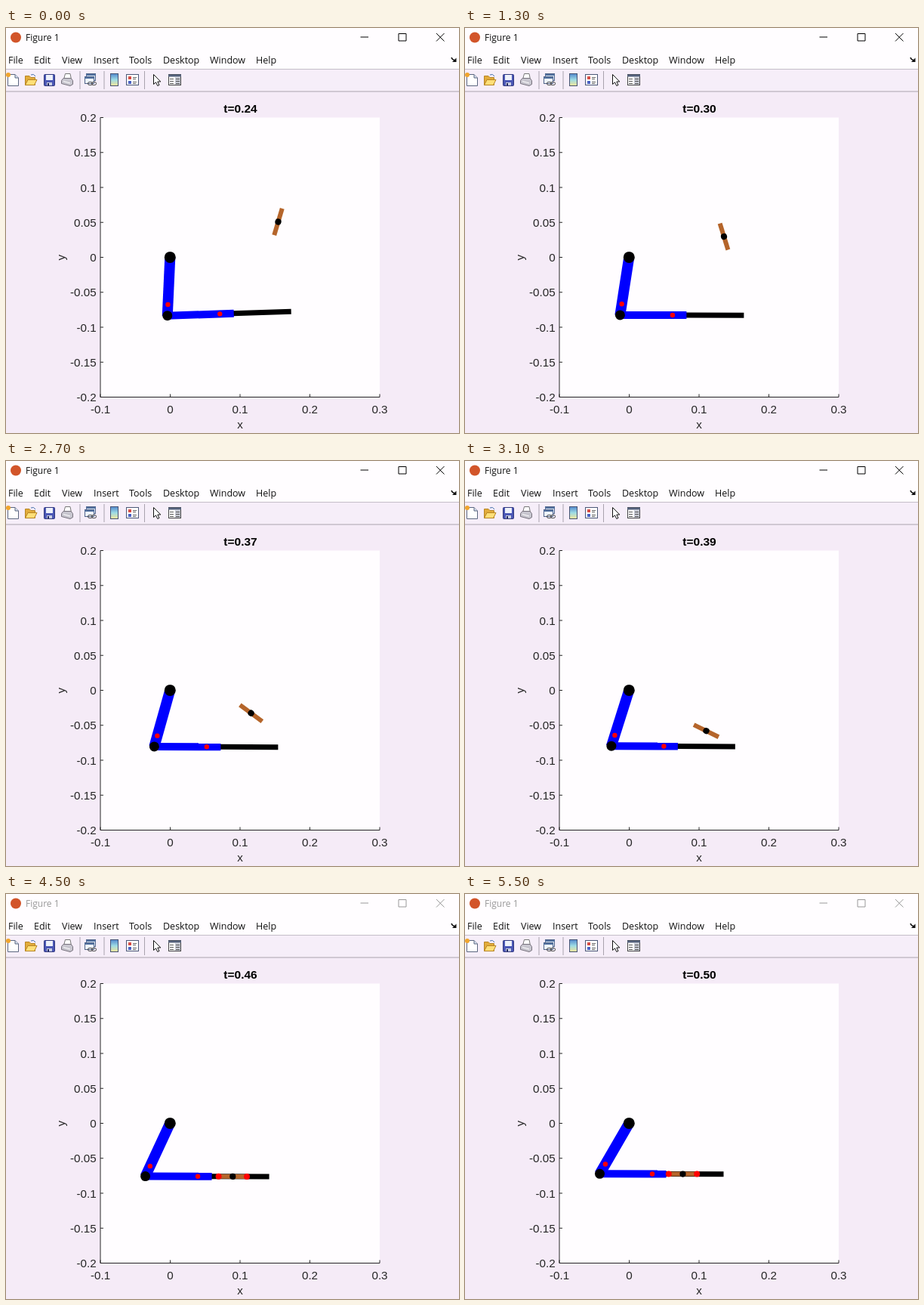
These frames come from a looping animation (600 by 536 pixels, 5600 ms). An HTML page:

```html
<!DOCTYPE html>
<html lang="en">
<head>
<meta charset="utf-8">
<title>Two-link arm catching a rod</title>
<style>
  html, body { margin: 0; width: 100%; height: 100%; overflow: hidden; background: #f5ebf7; }
  svg { display: block; width: 600px; height: 536px; }
  .ui { font: 12.5px "Open Sans", "Noto Sans", sans-serif; fill: #111; }
  .plot { font: 15.2px "Liberation Sans", Arial, sans-serif; fill: #262626; }
  .plot .title { font-weight: bold; font-size: 15.5px; fill: #000; }
  .mid { text-anchor: middle; }
  .end { text-anchor: end; }
  .line { fill: none; stroke: #262626; }
  .controls { fill: none; stroke: #000; }
  .caption { font-size: 12px; }
  .inactive .controls { stroke: #999; }
  .inactive .caption { fill: #999; }
</style>
</head>
<body>
<svg viewBox="0 0 600 536">
  <rect width="600" height="536" fill="#f5ebf7"/>
  <rect width="600" height="55" fill="#fffdff"/>
  <rect y="55" width="600" height="29" fill="#f6eef9"/>
  <path d="M0 54.5H600" stroke="#c4bec8"/>
  <path d="M0 84H600" stroke="#aaa2ad"/>

  <g id="titleBar" class="ui">
    <circle cx="13" cy="12.5" r="7" fill="#d2552a"/>
    <text class="caption" x="26" y="17">Figure 1</text>
    <path class="controls" d="M469.5 12H480M520 7.5H530V17H520ZM570 7L580.5 17.5M580.5 7L570 17.5"/>
  </g>
  <g id="menu" class="ui"></g>
  <path d="M590 39q1 3 4 3.5" fill="none" stroke="#111" stroke-width="1.5"/>
  <path d="M596.5 39.5V45H591Z" fill="#111"/>

  <g id="toolbar">
    <path d="M98 57V81M130 57V81M183.5 57V81" stroke="#a9a2ad"/>
    <!-- new -->
    <path d="M2.5 61.5H12L16.5 66V76.5H2.5Z" fill="#fff" stroke="#5b6680"/>
    <path d="M12 61.5V66H16.5" fill="#d5deef" stroke="#5b6680"/>
    <circle cx="3" cy="62" r="3" fill="#f0a52c"/>
    <!-- open -->
    <path d="M25.5 75.5V63.5H31L33 65.5H38.5V75.5Z" fill="#e2ac3b" stroke="#b78524"/>
    <path d="M25.5 75.5L29 68.5H41L37.5 75.5Z" fill="#ffdf78" stroke="#b78524"/>
    <path d="M33 62q4 -2 6 2" fill="none" stroke="#426eaa"/>
    <!-- save -->
    <rect x="50.5" y="61.5" width="14" height="15" rx="1" fill="#4b57b5" stroke="#30377d"/>
    <rect x="53" y="62" width="9" height="7" fill="#eef1fa"/>
    <rect x="54" y="72" width="7" height="4" fill="#c9cee2"/>
    <rect x="55" y="73" width="2" height="3" fill="#262b60"/>
    <!-- print -->
    <path d="M76.5 68L78.5 60.5H85L86.5 68" fill="#fff" stroke="#777"/>
    <path d="M73.5 69.5L76 66.5H86L88.5 69.5V74.5L85 76.5L73.5 73.5Z" fill="#c8c6cf" stroke="#77727d"/>
    <path d="M76 70.5L85 73" stroke="#fff"/>
    <!-- link -->
    <rect x="106.5" y="60.5" width="12" height="9" fill="#dce8f6" stroke="#53658a"/>
    <path d="M106 62H119" stroke="#53719f" stroke-width="2"/>
    <rect x="104.5" y="64.5" width="12" height="9" fill="#eef4fb" stroke="#53658a"/>
    <path d="M104 66H117" stroke="#53719f" stroke-width="2"/>
    <rect x="108.5" y="71.5" width="6" height="4" rx="2" fill="none" stroke="#444"/>
    <rect x="113.5" y="71.5" width="6" height="4" rx="2" fill="none" stroke="#444"/>
    <!-- colour bar -->
    <linearGradient id="bar" x2="0" y2="1">
      <stop stop-color="#5287cc"/><stop offset=".5" stop-color="#9ddbe4"/><stop offset="1" stop-color="#f2e69a"/>
    </linearGradient>
    <rect x="138.5" y="60.5" width="10" height="16" fill="url(#bar)" stroke="#465372"/>
    <!-- legend -->
    <rect x="159.5" y="61.5" width="16" height="14" fill="#fff" stroke="#4c5878"/>
    <rect x="162" y="64" width="4" height="4" fill="#d64c45"/>
    <rect x="162" y="70" width="4" height="4" fill="#4b62c4"/>
    <path d="M168 65.5H173M168 67.5H172M168 71.5H173M168 73.5H172" stroke="#666"/>
    <!-- pointer -->
    <path d="M195.5 61.5V74.5L198.5 71.8L200.8 76.5L203 75.4L200.8 71H204.8Z" fill="#fff" stroke="#111"/>
    <!-- inspector -->
    <rect x="215.5" y="61.5" width="16" height="14" fill="#fff" stroke="#444"/>
    <path d="M215 63H232" stroke="#55627d" stroke-width="3"/>
    <rect x="224" y="65" width="7" height="10" fill="#c9ccd6"/>
    <path d="M217 67.5H222M217 70.5H222M217 73.5H222M225 67.5H230M225 70.5H230M225 73.5H230" stroke="#555"/>
  </g>

  <rect x="125" y="118.5" width="370" height="370" fill="#fffdff"/>
  <path id="axes" class="line"/>
  <g id="labels" class="plot">
    <text id="clock" class="title mid" x="310.5" y="111.7"></text>
    <text class="mid" x="310" y="530">x</text>
    <text class="mid" transform="translate(77.5 303.7) rotate(-90)">y</text>
  </g>

  <g id="upper">
    <path d="M0 0H78" stroke="#00f" stroke-width="14"/>
  </g>
  <g id="fore">
    <path d="M87 0H164" stroke="#000" stroke-width="7"/>
    <path d="M0 0H88" stroke="#00f" stroke-width="10"/>
    <circle cx="69.5" r="3.2" fill="#f00"/>
  </g>
  <g id="joints">
    <circle id="upperMass" r="3.2" fill="#f00"/>
    <circle id="elbow" r="6.5"/>
    <circle cx="217.3" cy="303.4" r="7.5"/>
  </g>
  <g id="rod">
    <path d="M-18.3 0H18.3" stroke="#b5652b" stroke-width="6"/>
    <circle r="4.1"/>
    <g id="contacts" fill="#f00">
      <circle cx="-18.7" r="4"/><circle cx="18.7" r="4"/>
    </g>
  </g>
</svg>
<script>
const STEP = 100, STEPS = 56, CATCH = 34, INACTIVE = 43;
const SHOULDER = { x: 217.3, y: 303.4 }, UPPER = 77.4, UPPER_MASS = 62.6;
const RAD = Math.PI / 180;
const $ = id => document.getElementById(id);

function addText(parent, text, x, y, cls = "") {
  const el = document.createElementNS("http://www.w3.org/2000/svg", "text");
  el.textContent = text;
  el.setAttribute("x", x);
  el.setAttribute("y", y);
  el.setAttribute("class", cls);
  parent.append(el);
}

const menu = { File: 3, Edit: 37, View: 74, Insert: 116, Tools: 163, Desktop: 208, Window: 270, Help: 331 };
for (const [name, x] of Object.entries(menu)) addText($("menu"), name, x, 47);

let axes = "M125 118.5V488.5H495";
for (let i = 0; i <= 8; i++) {
  const y = 118.5 + i * 46.25;
  axes += `M125 ${y}h4`;
  addText($("labels"), +(0.2 - i * 0.05).toFixed(2), 119.6, y + 5.6, "end");
}
for (let i = 0; i <= 4; i++) {
  const x = 125 + i * 92.5;
  axes += `M${x} 488.5v-4`;
  addText($("labels"), +(i * 0.1 - 0.1).toFixed(1), x, 509.5, "mid");
}
$("axes").setAttribute("d", axes);

// Piecewise linear curve through [step, value] pairs.
function curve(points, n) {
  let i = 1;
  while (i < points.length - 1 && points[i][0] < n) i++;
  const [n0, v0] = points[i - 1], [n1, v1] = points[i];
  return v0 + (v1 - v0) * (n - n0) / (n1 - n0);
}

const upperSwing = [[0, 2.6], [13, 8.85], [22, 13.3], [31, 17.6], [36, 20.4], [45, 25], [55, 30.1]];
const foreTilt = [[0, -1.9], [6, -.7], [13, .1], [22, .3], [55, .1]];
const rodX = [[0, 360.5], [13, 343], [22, 331], [31, 319.5], [36, 312.5], [45, 300.3], [55, 288.5]];

const place = (id, x, y, angle = 0) =>
  $(id).setAttribute("transform", `translate(${x} ${y}) rotate(${angle})`);

const alongUpper = (angle, d) => ({
  x: SHOULDER.x - d * Math.sin(angle * RAD),
  y: SHOULDER.y + d * Math.cos(angle * RAD)
});

function draw(n) {
  const swing = curve(upperSwing, n), tilt = curve(foreTilt, n);
  const elbow = alongUpper(swing, UPPER), mass = alongUpper(swing, UPPER_MASS);
  place("upper", SHOULDER.x, SHOULDER.y, 90 + swing);
  place("fore", elbow.x, elbow.y, tilt);
  place("elbow", elbow.x, elbow.y);
  place("upperMass", mass.x, mass.y);

  // The rod falls freely while spinning, then slides along the forearm.
  const caught = n >= CATCH, x = curve(rodX, n);
  const y = caught
    ? elbow.y + (x - elbow.x) * Math.tan(tilt * RAD)
    : 256.5 + .24 * n + .097 * n * n;
  place("rod", x, y, caught ? tilt : 106.7 - 2.6 * n);
  $("contacts").style.display = caught ? "" : "none";

  $("clock").textContent = "t=" + (.243 + .00473 * n).toFixed(2);
  $("titleBar").classList.toggle("inactive", n >= INACTIVE);
}

const start = performance.now();
function tick() {
  draw(Math.floor((performance.now() - start) / STEP) % STEPS);
  requestAnimationFrame(tick);
}
tick();
</script>
</body>
</html>
```
